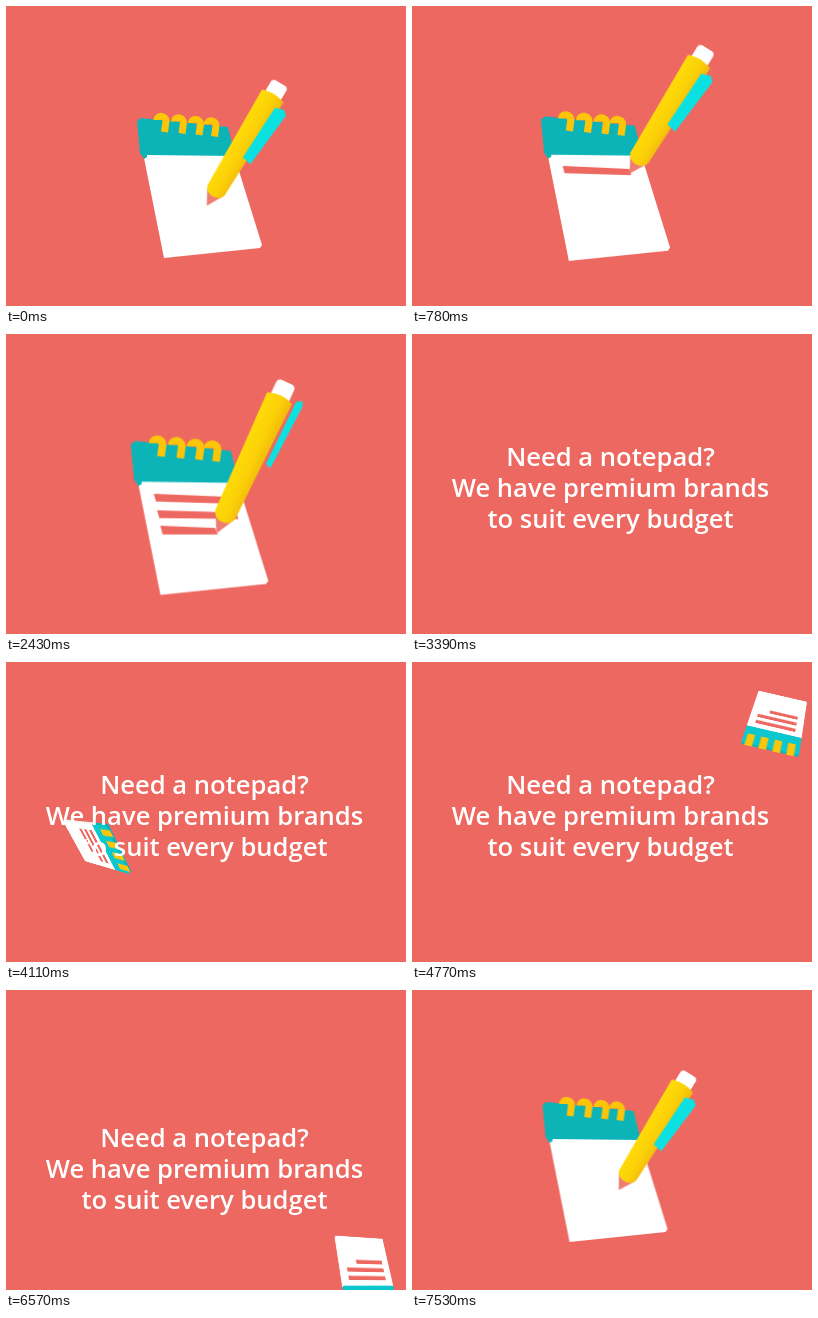
These frames come from a looping animation (400x300 px, 7.56 s). An HTML page:

```html
<!DOCTYPE html>
<html lang="en">
<head>
<meta charset="utf-8">
<title>Notepad</title>
<style>
  :root { --coral: #ed6860; --yellow: #fcc50a; --loop: 7560ms; }
  html, body { margin: 0; width: 100%; height: 100%; overflow: hidden; background: var(--coral); }
  .stage { position: relative; width: 400px; height: 300px; overflow: hidden; }
  .layer { position: absolute; inset: 0; width: 400px; height: 300px; }
  .layer g, .lines polygon { animation: var(--loop) linear infinite; }
  .ring { fill: none; stroke: var(--yellow); stroke-width: 7; }

  /* Writing scene */
  .layer .scene { transform-origin: 194px 182px; animation-name: zoom; }
  .layer .pad { transform-origin: 194px 182px; animation-name: pad; }
  .layer .pen { animation-name: pen; }
  .layer .clip { animation-name: roll; }
  .lines polygon { fill: var(--coral); transform-box: fill-box; transform-origin: left; }
  .lines polygon:nth-child(1) { animation-name: line1; }
  .lines polygon:nth-child(2) { animation-name: line2; }
  .lines polygon:nth-child(3) { animation-name: line3; }

  @keyframes zoom {
    0%, 85%, 100% { transform: none; }
    32.14%, 45% { transform: translateY(2px) scale(1.1); }
  }
  @keyframes pad {
    0%, 100% { transform: translate(0, 0) rotate(0deg); }
    32.5% { transform: translate(0, 0) rotate(0deg); animation-timing-function: ease-in; }
    39.7% { transform: translate(-300px, 60px) rotate(-40deg); }
    87.9% { transform: translate(-270px, 0) rotate(0deg); animation-timing-function: ease-out; }
  }
  @keyframes pen {
    0%, 100% { transform: translate(201px, 200px) rotate(31deg) scaleY(1); }
    2.38% { transform: translate(160px, 154px) rotate(30deg) scaleY(1); }
    3.57% { transform: translate(153px, 164px) rotate(30deg) scaleY(1); }
    11.1% { transform: translate(224px, 168px) rotate(32deg) scaleY(1); }
    12.7% { transform: translate(190px, 153px) rotate(31deg) scaleY(1); }
    14.3% { transform: translate(156px, 179px) rotate(30deg) scaleY(1); }
    20.63% { transform: translate(223px, 181px) rotate(32.7deg) scaleY(1.01); }
    22.6% { transform: translate(195px, 169px) rotate(30deg) scaleY(1.02); }
    24.2% { transform: translate(159px, 194px) rotate(26deg) scaleY(1.04); }
    30.95% { transform: translate(209px, 196px) rotate(25deg) scaleY(1.06); }
    32.5% { transform: translate(209px, 196px) rotate(25deg) scaleY(1.06); animation-timing-function: ease-in; }
    38.6% { transform: translate(430px, 330px) rotate(70deg) scaleY(1.06); }
    88.6% { transform: translate(430px, 230px) rotate(55deg) scaleY(.95); }
    93.25% { transform: translate(290px, 212px) rotate(45deg) scaleY(.95); }
    99.6% { transform: translate(207px, 200px) rotate(31.5deg) scaleY(.95); }
  }
  @keyframes roll {
    0%, 21%, 85%, 100% { transform: none; }
    32%, 45% { transform: translate(11px, -12px) scaleX(.52); }
  }
  @keyframes line1 {
    0%, 3.57%, 85%, 100% { transform: scaleX(0); }
    11.1%, 84.9% { transform: none; }
  }
  @keyframes line2 {
    0%, 14.3%, 85%, 100% { transform: scaleX(0); }
    20.63%, 84.9% { transform: none; }
  }
  @keyframes line3 {
    0%, 24.2%, 85%, 100% { transform: scaleX(0); }
    30.95%, 84.9% { transform: none; }
  }

  /* Falling pads */
  .fall {
    position: absolute; left: calc(var(--x) - 27px); top: -39px; width: 54px; height: 78px;
    perspective: 320px; animation: fall var(--loop) var(--start) infinite both;
  }
  .spin, .spin > * { position: absolute; inset: 0; width: 54px; height: 78px; }
  .spin { transform-style: preserve-3d; animation: spin var(--loop) var(--start) linear infinite both; }
  .spin svg { overflow: visible; }
  .spin .ring { stroke: #f8d80c; stroke-width: 5; }
  .back {
    transform: translateZ(-3px);
    background: linear-gradient(#0cb4b8 22px, #f4f4f4 22px);
  }
  @keyframes fall {
    0% { transform: translateY(-50px); animation-timing-function: cubic-bezier(.35, .2, .75, .75); }
    13.889%, 100% { transform: translateY(350px); }
  }
  @keyframes spin {
    0% { transform: rotateZ(var(--z0)) rotateX(var(--x0)) rotateY(var(--y0)); }
    13.889%, 100% { transform: rotateZ(var(--z1)) rotateX(var(--x1)) rotateY(var(--y1)); }
  }

  /* Message */
  .layer .message {
    font: 600 25.6px "Open Sans", "Noto Sans", sans-serif;
    fill: #fff; text-anchor: middle; animation-name: message;
  }
  @keyframes message {
    0%, 41.27% { transform: translateY(-205px); animation-timing-function: ease-out; }
    43.25% { transform: translateY(22px); animation-timing-function: ease-in-out; }
    44.84%, 83.7% { transform: translateY(0); animation-timing-function: ease-in-out; }
    85.7% { transform: translateY(-9px); animation-timing-function: ease-in; }
    89.3%, 100% { transform: translateY(205px); }
  }
</style>
</head>
<body>
<div class="stage">
  <svg class="layer" viewBox="0 0 400 300">
    <defs>
      <linearGradient id="barrel">
        <stop offset="0" stop-color="#ffdc08"/>
        <stop offset=".6" stop-color="#fbd007"/>
        <stop offset="1" stop-color="#f2b90c"/>
      </linearGradient>
      <path id="ring" d="M151 114C151 109 159.500 109 160 115L158.500 126"/>
      <g id="small">
        <path fill="#fff" d="M0 20H54V78H0Z"/>
        <path fill="#0cc8ce" d="M0 0H54V22H0Z"/>
        <path fill="#ed6860" d="M7 28H47V32.500H7ZM7 37H47V41.500H7ZM7 46H36V50.500H7Z"/>
        <path class="ring" d="M8 12V-3M21 12V-3M34 12V-3M47 12V-3"/>
      </g>
    </defs>
    <g class="scene">
      <g class="pad">
        <path fill="#fff" d="M138 152L141 148L228 149L256 239L254 242L158 252Z"/>
        <path fill="#0cb4b8" d="M131 115L135 112L222 121L229 150L141 149L141 151L138 153L134 147Z"/>
        <g class="ring">
          <use href="#ring"/>
          <use href="#ring" x="17.500" y="1.500"/>
          <use href="#ring" x="34.500" y="3"/>
          <use href="#ring" x="50" y="4.500"/>
        </g>
        <g class="lines">
          <polygon points="152,160 224,163 226,169 154,167"/>
          <polygon points="155,175 227,177 229,183 157,182"/>
          <polygon points="158,189 208,191 210,197 160,197"/>
        </g>
      </g>
      <g class="pen">
        <path fill="#ee7d74" d="M0 0L-9 -16H9Z"/>
        <rect x="-9" y="-143" width="18" height="20" rx="4" fill="#fff"/>
        <path fill="url(#barrel)" d="M-12.500 -128L-10 -18Q-8 -11 0 -11Q8 -11 10 -18L12.500 -128Q0 -133 -12.500 -128Z"/>
        <g class="clip"><path fill="#0ce1e2" d="M6 -60L16 -58L21.500 -118L17 -122L8 -119Z"/></g>
      </g>
    </g>
  </svg>

  <div id="pads"></div>

  <svg class="layer" viewBox="0 0 400 300">
    <g class="message">
      <text x="198.500" y="132">Need a notepad?</text>
      <text x="198.500" y="163">We have premium brands</text>
      <text x="198.500" y="194">to suit every budget</text>
    </g>
  </svg>
</div>
<script>
  // x, start time, then the first and last angles about z, x and y
  const pads = [
    [88, 3450, [20, -30, 20], [150, -70, 60]],
    [365, 4418, [160, -20, 20], [260, -100, -37]],
    [48, 4750, [270, 20, -60], [170, -75, 15]],
    [163, 5248, [176, 30, 30], [276, -40, 140]],
    [360, 5690, [60, -50, 40], [190, -20, -40]]
  ];
  const angles = (turn, i) => ["z", "x", "y"].map((axis, k) => `--${axis}${i}:${turn[k]}deg`).join(";");
  document.getElementById("pads").innerHTML = pads.map(([x, start, from, to]) => `
    <div class="fall" style="--x:${x}px;--start:${start}ms;${angles(from, 0)};${angles(to, 1)}">
      <div class="spin"><div class="back"></div><svg viewBox="0 0 54 78"><use href="#small"/></svg></div>
    </div>`).join("");
</script>
</body>
</html>
```
